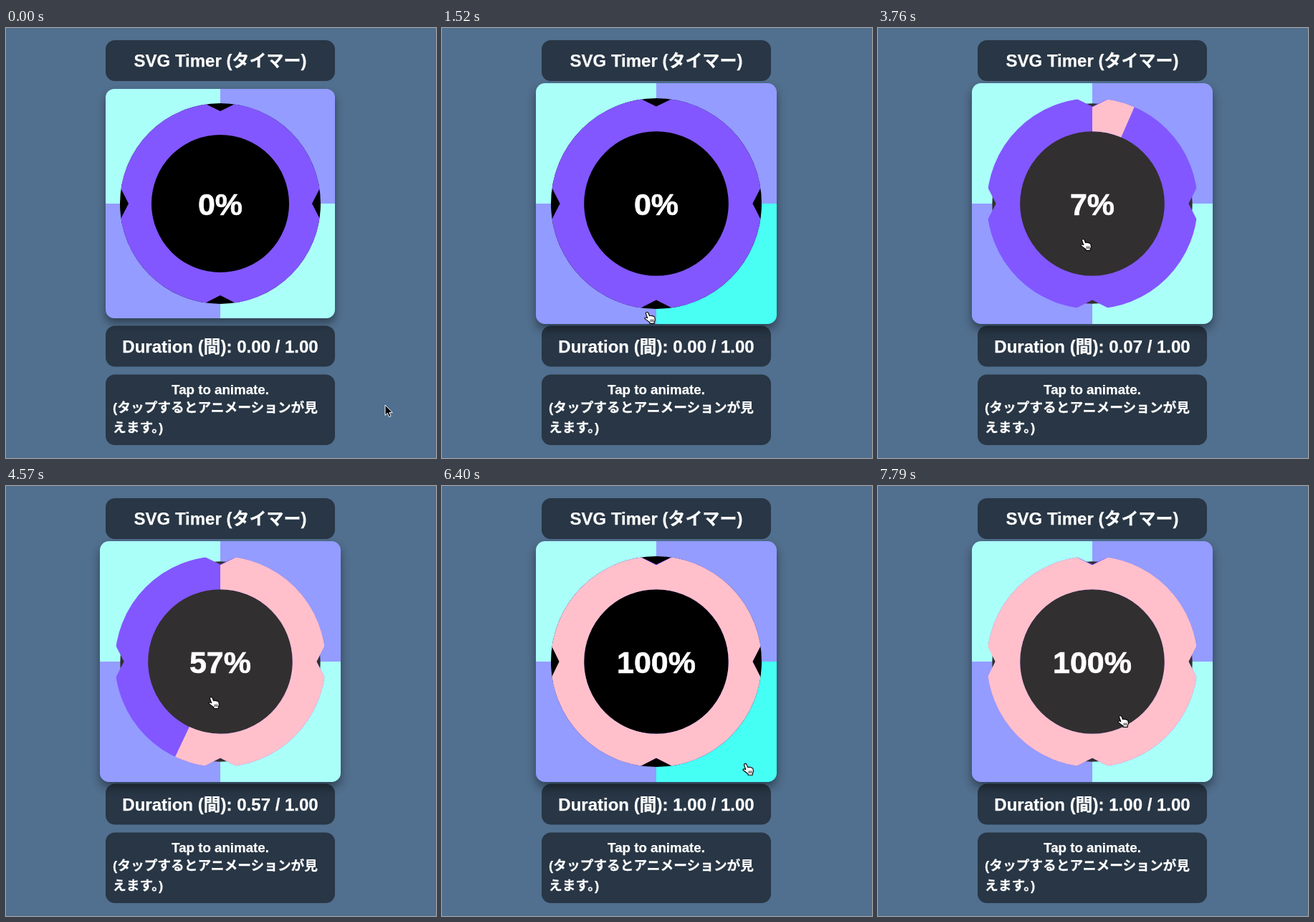
Write an HTML page that moves like this. It is 600 px wide and 600 px high and loops after 8000 ms.

```html
<!DOCTYPE html>
<html lang="en">
<head>
<meta charset="utf-8">
<title>SVG Timer</title>
<style>
  html, body { margin: 0; width: 100%; height: 100%; overflow: hidden; background: #516f8e; }
  svg { display: block; width: 100vw; height: 100vh; }
  text {
    font: bold 24px "Liberation Sans", "Noto Sans CJK JP", "Noto Sans CJK", sans-serif;
    fill: #fff; stroke: #fff; stroke-width: .25px;
  }
  .mid { text-anchor: middle; }
  .note text { font-size: 18.72px; }
  .panel { fill: #283645; }
  .ring { fill: none; stroke-width: 44px; clip-path: url(#notched); }
  #shadow { filter: blur(6px); }
  #percent { font-size: 43px; stroke-width: .7px; }
</style>
</head>
<body>
<svg viewBox="0 0 600 600">
  <defs>
    <clipPath id="rounded"><rect x="-160" y="-160" width="320" height="320" rx="12"/></clipPath>
    <clipPath id="notched">
      <path d="M-150-150H-43L0-129L43-150H150V-43L128 0L150 43V150H43L0 128L-43 150H-150V43L-128 0L-150-43Z"/>
    </clipPath>
  </defs>

  <g class="panel">
    <rect x="139" y="17" width="320" height="57" rx="13"/>
    <rect x="139" y="415.5" width="320" height="57" rx="13"/>
    <rect x="139" y="483.5" width="320" height="98.5" rx="13"/>
  </g>
  <text class="mid" x="299" y="54">SVG Timer (タイマー)</text>
  <text class="mid" id="duration" x="299" y="453"></text>
  <g class="note">
    <text class="mid" x="299" y="511">Tap to animate.</text>
    <text x="149" y="536">(タップするとアニメーションが見</text>
    <text x="149" y="564">えます。</text>
    <text x="213" y="564">)</text>
  </g>

  <g id="card">
    <rect id="shadow" x="-160" y="-153" width="320" height="320" rx="12" opacity=".4"/>
    <g id="quadrants" clip-path="url(#rounded)"></g>
    <circle id="dial"/>
    <circle class="ring" r="118" stroke="#8257ff"/>
    <circle class="ring" id="progress" r="118" stroke="#ffc0cb" pathLength="100" transform="rotate(-90)"/>
  </g>
  <text class="mid" id="percent" x="299" y="261"></text>

  <path id="arrow" stroke="#fff" d="M0 0V14.5L3.3 11.4L5.6 16.6L8 15.6L5.8 10.6H10.2Z"/>
  <g id="hand" stroke="#000" stroke-width="1.1" stroke-linejoin="round">
    <path fill="#fff" d="M-1.6 1.3Q-1.4-.5.3-.5Q1.7-.4 2.2 1L3.6 4.7Q4.8 3.7 6 4.7Q7.4 3.9 8.4 5.2Q10.2 4.8 10.8 6.6L11.4 10Q11.3 12 10.2 13V15.4H4V13.8Q1 11.8-3 8.4Q-3.2 6.6-.8 7L.8 7.8Z"/>
    <path fill="none" stroke-width=".8" d="M5.2 9.5V13M7 9.5V13M8.8 9.5V13"/>
  </g>
</svg>
<script>
const LOOP = 8000, CX = 299, CY = 245;
const $ = id => document.getElementById(id);
const set = (el, attrs) => Object.entries(attrs).forEach(([k, v]) => el.setAttribute(k, v));
const ramp = (t, from, to) => Math.min(1, Math.max(0, (t - from) / (to - from)));
const ease = k => k * k * (3 - 2 * k);
const mix = (a, b, k) => a + (b - a) * k;
const blend = (from, to, k) => `color-mix(in srgb, ${to} ${k * 100}%, ${from})`;

// Pointer: a lap along the card's rim, with straight moves before and after it.
function rim(t) {
  const degrees = 49 + 266 * ramp(t, 1280, 1860) ** 2 + 143 * ramp(t, 2100, 2290);
  const x = Math.cos(degrees * Math.PI / 180), y = Math.sin(degrees * Math.PI / 180);
  const reach = 152 / Math.max(Math.abs(x), Math.abs(y));
  return { x: CX + x * reach, y: CY + y * reach };
}

const moves = [
  { from: 2290, to: 2510, x: 228, y: 351 },
  { from: 2720, to: 2860, x: 286, y: 295 },
  { from: 4570, to: 5260, x: 289, y: 317 },
  { from: 5800, to: 6580, x: 463, y: 409 },
  { from: 6620, to: 6850, x: 538, y: 474 },
  { from: 6960, to: 7250, x: 396, y: 352 },
  { from: 7470, to: 7530, x: 338, y: 321 }
];

const step = (p, q, k) => ({ x: mix(p.x, q.x, k), y: mix(p.y, q.y, k) });

function pointerAt(t) {
  const entering = step({ x: 529, y: 526 }, rim(t), ramp(t, 470, 840));
  return moves.reduce((p, move) => step(p, move, ramp(t, move.from, move.to)), entering);
}

// Hit tests on the pointer, relative to the card's centre.
const onCard = (x, y) => Math.max(Math.abs(x), Math.abs(y)) < 166;
const onHole = (x, y) => Math.hypot(x, y) < 101;
const onQuadrant = (sx, sy) => (x, y) =>
  onCard(x, y) && Math.hypot(x, y) > 147 && x * sx > 0 && y * sy > 0;

function hitAt(t, test) {
  const p = pointerAt(t);
  return test(p.x - CX, p.y - CY);
}

// Share of the last `fade` ms spent over a shape: its hover transition.
function hover(t, test, fade) {
  const samples = 30;
  let hits = 0;
  for (let i = 0; i < samples; i++) hits += hitAt(t - fade * i / samples, test);
  return ease(hits / samples);
}

const quadrants = [];
for (const sx of [-1, 1]) {
  for (const sy of [-1, 1]) {
    const el = document.createElementNS('http://www.w3.org/2000/svg', 'rect');
    set(el, { x: Math.min(0, sx * 160), y: Math.min(0, sy * 160), width: 160, height: 160 });
    $('quadrants').append(el);
    const colors = sx === sy ? ['#abfff9', '#46fff4'] : ['#949cff', '#5c67ff'];
    quadrants.push({ el, colors, test: onQuadrant(sx, sy) });
  }
}

function draw(t) {
  const scale = 1 + 0.05 * hover(t, onCard, 260);
  set($('card'), { transform: `translate(${CX} ${CY}) scale(${scale})` });
  for (const { el, colors, test } of quadrants) {
    el.style.fill = blend(...colors, hover(t, test, 150));
  }

  const focus = hover(t, onHole, 260);
  set($('dial'), { r: mix(140, 133, focus) });
  $('dial').style.fill = blend('#000000', '#322f30', focus);

  const done = ramp(t, 3656, 5260);
  const percent = Math.round(done * 100);
  set($('progress'), { 'stroke-dasharray': `${done * 100} 200` });
  $('progress').style.visibility = done > 0 ? 'visible' : 'hidden';
  $('percent').textContent = `${percent}%`;
  $('duration').textContent = `Duration (間): ${(percent / 100).toFixed(2)} / 1.00`;

  const { x, y } = pointerAt(t);
  const shown = hitAt(t - 50, onCard) ? 'hand' : 'arrow';
  for (const id of ['arrow', 'hand']) {
    set($(id), { transform: `translate(${x} ${y})` });
    $(id).style.display = id === shown ? '' : 'none';
  }
}

const start = performance.now();
function tick() {
  draw((performance.now() - start) % LOOP);
  requestAnimationFrame(tick);
}
tick();
</script>
</body>
</html>
```
